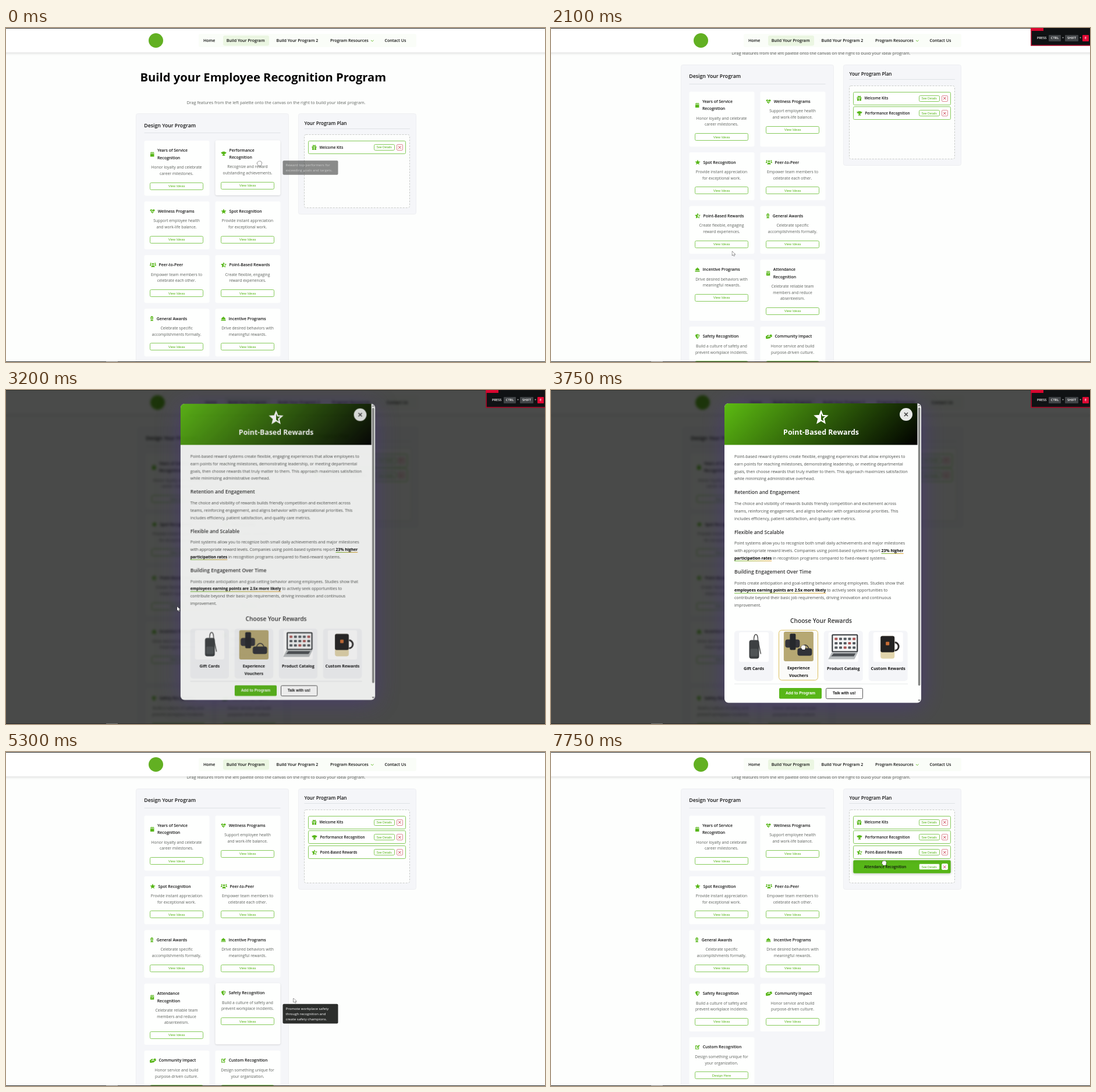
An HTML page with a canvas for the animation above (7.8 s loop, 926 px wide and 575 px high).

```html
<!DOCTYPE html>
<html lang="en">
<head>
<meta charset="utf-8">
<title>Recognition program builder</title>
<style>
html, body { margin: 0; width: 100%; height: 100%; overflow: hidden; background: #fdfefd; }
canvas { display: block; }
</style>
</head>
<body>
<canvas id="stage" width="926" height="575"></canvas>
<script>
const W = 926, H = 575, LOOP = 7800;
const GREEN = '#57b618', EDGE = '#78c448';
const SANS = '"Open Sans", "Noto Sans", sans-serif', ARIAL = '"Liberation Sans", Arial, sans-serif';
const view = document.getElementById('stage').getContext('2d');
const layer = () => Object.assign(document.createElement('canvas'), { width: W, height: H }).getContext('2d');
const page = layer(), ghost = layer();
let g = view;

// Times (ms) of the main events
const DROP1 = 1050, OPEN = 3000, CLOSE = 4600, DRAG2 = 6250, DROP2 = 7400;

const clamp = v => Math.max(0, Math.min(1, v));
const ramp = (t, a, b) => clamp((t - a) / (b - a));
const ease = k => k * k * (3 - 2 * k);

function starPath(cx, cy, r) {
  let d = '';
  for (let i = 0; i < 10; i++) {
    const a = i * Math.PI / 5 - Math.PI / 2, q = i % 2 ? r * 0.45 : r;
    d += (i ? 'L' : 'M') + (cx + q * Math.cos(a)) + ' ' + (cy + q * Math.sin(a));
  }
  return d + 'z';
}
const disc = (x, y, r) => `M${x - r} ${y}a${r} ${r} 0 1 0 ${2 * r} 0a${r} ${r} 0 1 0 ${-2 * r} 0z`;
const CAL = 'M1 3h14v13h-14zM4 0h2v4h-2zM10 0h2v4h-2z';

// Icons in a 16 unit box: [filled shape, light line on top]
const ICONS = {
  cal: [CAL, 'M1 6h14'],
  check: [CAL, 'M1 6h14M5 10l2 2l4-4'],
  trophy: ['M4 1h8v2h4c0 4-2 5-5 6c-1 2-2 2-2 3h3v3h-8v-3h3c0-1-1-1-2-3c-3-1-5-2-5-6h4z'],
  heart: ['M8 15L1 8C-2 4 3-1 8 4C13-1 18 4 15 8z', 'M0 8h4l2-3l3 6l2-3h5'],
  star: [starPath(8, 8.5, 8.8)],
  people: [disc(8, 5, 2.7) + disc(2, 3, 2) + disc(14, 3, 2) + 'M3 15c0-8 10-8 10 0zM-1 10c0-5 5-5 5-2l-2 2zM17 10c0-5-5-5-5-2l2 2z'],
  award: [disc(8, 6, 6) + 'M4 10h8l2 6l-4-1l-2 1l-2-1l-4 1z', disc(8, 6, 2)],
  bell: ['M1 11a7 7 0 0 1 14 0zM0 12.5h16v2.5h-16zM6.5 2h3v3h-3z'],
  shield: ['M8 0l7 3c0 6-3 10-7 13c-4-3-7-7-7-13z', 'M9 3l3 1.5c0 4-1 5-3 7z'],
  hands: ['M-1 8l6-5l4 1l5-3l3 6l-7 7l-10 2z', 'M4 10l4-4l4 3'],
  pen: ['M1 3h7v2h-5v8h8v-5h2v7h-12zM6 8l7-7l3 2l-8 8h-2z'],
  gift: ['M0 5h16v4h-16zM1 10h14v6h-14zM3 4c-2-5 4-5 5-1c1-4 7-4 5 1z', 'M8 5v11']
};

const card = (icon, dx, title, desc, tip = '') =>
  ({ icon, dx, title: title.split('|'), desc: desc.split('|'), tip: tip.split('|') });
const CARDS = {
  years: card('cal', 12.4, 'Years of Service|Recognition', 'Honor loyalty and celebrate|career milestones.'),
  perf: card('trophy', 14, 'Performance|Recognition', 'Recognize and reward|outstanding achievements.', 'Reward top performers for|exceeding goals and targets.'),
  well: card('heart', 13.2, 'Wellness Programs', 'Support employee health|and work-life balance.'),
  spot: card('star', 14, 'Spot Recognition', 'Provide instant appreciation|for exceptional work.'),
  peer: card('people', 15, 'Peer-to-Peer', 'Empower team members to|celebrate each other.'),
  point: card('half', 14, 'Point-Based Rewards', 'Create flexible, engaging|reward experiences.', 'Build a flexible program|where points are earned|and redeemed easily.'),
  general: card('award', 11.2, 'General Awards', 'Celebrate specific|accomplishments formally.'),
  incent: card('bell', 13, 'Incentive Programs', 'Drive desired behaviors with|meaningful rewards.'),
  attend: card('check', 12.2, 'Attendance|Recognition', 'Celebrate reliable team|members and reduce|absenteeism.', 'Recognize perfect|attendance and improvement|to build reliability culture.'),
  safety: card('shield', 13.2, 'Safety Recognition', 'Build a culture of safety and|prevent workplace incidents.', 'Promote workplace safety|through recognition and|create safety champions.'),
  community: card('hands', 15, 'Community Impact', 'Honor service and build|purpose-driven culture.'),
  custom: card('pen', 13.2, 'Custom Recognition', 'Design something unique for|your organization.')
};
const KITS = card('gift', 13, 'Welcome Kits', '');

// Outlined boxes snap to the pixel grid so their lines stay thin
function box(x, y, w, h, r, fill, stroke) {
  if (stroke) [x, y, w, h] = [Math.floor(x) + 0.5, Math.floor(y) + 0.5, Math.floor(w), Math.floor(h)];
  g.beginPath();
  g.roundRect(x, y, w, h, r);
  if (fill) { g.fillStyle = fill; g.fill(); }
  if (stroke) { g.strokeStyle = stroke; g.lineWidth = 0.9; g.stroke(); }
}
function text(s, x, y, size, color = '#111', weight = 400, align = 'left', family = SANS) {
  g.font = `${weight} ${size}px ${family}`;
  g.textAlign = align;
  g.fillStyle = color;
  g.fillText(s, x, y + size * 0.35);
}
function shape(d, fill) { g.fillStyle = fill; g.fill(new Path2D(d)); }
function rule(x, y, w, color) { g.fillStyle = color; g.fillRect(x, y, w, 1); }
function shadow(color, blur, dy = 0) { g.shadowColor = color; g.shadowBlur = blur; g.shadowOffsetY = dy; }
function noShadow() { shadow('transparent', 0); }

function icon(name, x, cy, w, h, color = GREEN, light = '#fff') {
  g.save();
  g.translate(x, cy - h / 2);
  g.scale(w / 16, h / 16);
  g.lineWidth = 1.7;
  if (name === 'half') {
    const star = new Path2D(starPath(8, 8.5, 8));
    g.strokeStyle = color;
    g.stroke(star);
    g.beginPath();
    g.rect(-2, -2, 10, 20);
    g.clip();
    g.fillStyle = color;
    g.fill(star);
  } else {
    shape(ICONS[name][0], color);
    g.strokeStyle = light;
    if (ICONS[name][1]) g.stroke(new Path2D(ICONS[name][1]));
  }
  g.restore();
}

function layout(placed, scroll) {
  const names = Object.keys(CARDS).filter(n => !placed.includes(n)), spots = {};
  const height = n => 61 + 12.3 * (CARDS[n].title.length - 1) + 10.7 * CARDS[n].desc.length;
  for (let i = 0, y = 194 - scroll; i < names.length; i += 2) {
    const row = names.slice(i, i + 2), h = Math.max(...row.map(height));
    row.forEach((n, col) => spots[n] = { x: col ? 359.5 : 237.5, y, w: 112, h });
    y += h + 9.9;
  }
  return spots;
}

function drawCard(name, s, lifted, pressed) {
  const c = CARDS[name], mid = s.x + 55.5, lines = c.title.length;
  let y = s.y - (lifted ? 0.8 : 0);
  if (lifted) shadow('rgba(0,0,0,.14)', 3, 1);
  box(s.x, y, s.w, s.h, 3, '#fefffe');
  noShadow();
  y += 17;
  icon(c.icon, s.x + 10, y + (lines - 1) * 6.2, c.dx - 5, 8.5);
  c.title.forEach((l, i) => text(l, s.x + 10 + c.dx, y + i * 12.4, 6.9, '#111', 600));
  y += (lines - 1) * 12.4 + 16.5;
  c.desc.forEach((l, i) => text(l, mid, y + i * 10.7, 6.75, '#5c605c', 400, 'center'));
  y += (c.desc.length - 1) * 10.7 + 21.4;
  box(s.x + 10, y - 6, 91, 12, 2, pressed ? GREEN : '#fff', EDGE);
  text(name === 'custom' ? 'Design Here' : 'View Ideas', mid, y, 5.9, pressed ? '#fff' : GREEN, 400, 'center', ARIAL);
}

function drawTip(name, s, alpha) {
  const tip = CARDS[name].tip, h = tip.length * 9.3 + 6;
  const x = s.x + 116, y = s.y + s.h / 2 - h / 2 - 0.8;
  g.save();
  g.globalAlpha *= alpha;
  box(x, y, 95, h, 2, '#2c2e2c');
  tip.forEach((l, i) => text(l, x + 5, y + 7.8 + i * 9.3, 6.1, '#fff'));
  g.restore();
}

function drawItem(c, y, hot) {
  if (hot) { y -= 0.8; shadow('rgba(0,0,0,.2)', 4, 1); }
  box(519.5, y - 11, 167, 22, 2, hot ? GREEN : '#fff', EDGE);
  noShadow();
  icon(c.icon, 525.5, y, c.dx - 5, 8.5, GREEN, hot ? GREEN : '#fff');
  text(c.title.join(' '), 525.5 + c.dx, y, 6.3, '#111', 600);
  box(632, y - 5, 35, 10, 2, '#fff', EDGE);
  text('See Details', 649.7, y, 5.2, GREEN, 400, 'center', ARIAL);
  box(671, y - 5, 10, 10, 1.5, '#fff', hot ? '#fff' : '#d8808a');
  g.strokeStyle = '#c52b3d';
  g.beginPath();
  for (const d of [-1, 1]) { g.moveTo(674, y - 2.3 * d); g.lineTo(678.6, y + 2.3 * d); }
  g.stroke();
}

function drawPlan(items, scroll, over, hotIndex) {
  const y = 147.5 - scroll;
  box(502.5, y, 202, 173, 3, '#f5f6f9', '#eceef1');
  text('Your Program Plan', 512.5, y + 16.5, 8.15, '#111', 600);
  rule(512.5, Math.round(y + 25), 181.5, '#dfe2e6');
  g.setLineDash([3, 2]);
  box(512.5, y + 36, 181, 126, 3, '#fdfefd', over ? '#74c63e' : '#c4c8c4');
  g.setLineDash([]);
  items.forEach((c, i) => drawItem(c, y + 58 + i * 25.9, i === hotIndex));
  if (over) {
    const tint = g.createLinearGradient(513, y + 36, 693, y + 162);
    tint.addColorStop(0, 'rgba(70,145,225,.13)');
    tint.addColorStop(1, 'rgba(110,180,190,.07)');
    box(513, y + 36, 180.5, 126, 3, tint);
  }
}

function drawHeader() {
  shadow('rgba(0,0,0,.16)', 5, 1);
  box(-10, 0, W + 20, 42, 0, '#fff');
  noShadow();
  g.fillStyle = '#62b022';
  g.beginPath();
  g.arc(257.5, 21.5, 12.5, 0, 7);
  g.fill();
  box(331, 10, 374, 23, 3, '#fafdf8');
  box(373, 13, 79, 17.5, 3, '#ebf6e2');
  const menu = [['Home', 339], ['Build Your Program', 378.7], ['Build Your Program 2', 464.5], ['Program Resources', 557], ['Contact Us', 650.5]];
  menu.forEach(([s, x]) => text(s, x, 21.7, 7.05, '#111', 600));
  g.strokeStyle = GREEN;
  g.lineWidth = 0.9;
  g.stroke(new Path2D('M627 21l2.3 2l2.3-2'));
}

function drawPage(t, placed, spots, scroll) {
  g.fillStyle = '#fdfefd';
  g.fillRect(0, 0, W, H);
  g.save();
  if (t >= OPEN && t < CLOSE + 150) g.translate(3, 0);
  text('Build your Employee Recognition Program', 230.5, 84.5 - scroll, 20.2, '#050505', 700);
  text('Drag features from the left palette onto the canvas on the right to build your ideal program.', 464, 128 - scroll, 7.22, '#606460', 400, 'center');
  box(223.5, 147.5 - scroll, 262, 600, 3, '#f5f6f9', '#eceef1');
  text('Design Your Program', 237.3, 167.7 - scroll, 8.75, '#111', 600);
  rule(237.5, Math.round(180 - scroll), 234, '#dfe2e6');

  const hover = hovered(t);
  for (const n in spots) drawCard(n, spots[n], n === hover.name, n === 'point' && t > 2450 && t < 3200);
  const over = (t > 650 && t < DROP1) || (t > DRAG2 + 200 && t < DROP2);
  const hot = t >= DROP2 ? 3 : t >= DROP1 && t < 1250 ? 1 : -1;
  drawPlan([KITS, ...placed.map(n => CARDS[n])], scroll, over, hot);
  if (hover.name && spots[hover.name]) drawTip(hover.name, spots[hover.name], hover.alpha);
  drawHeader();
  g.restore();
}

function hovered(t) {
  if (t < DROP1) return { name: 'perf', alpha: 0.55 + 0.45 * ramp(t, 50, 200) };
  const spans = [['point', 2200, 3200], ['safety', 4950, 5500], ['attend', 5650, DROP2]];
  const s = spans.find(([, a, b]) => t >= a && t < b);
  return s ? { name: s[0], alpha: ramp(t, s[1], s[1] + 150) } : {};
}

// Dragged copy of a card, fading out with distance from the pointer
function drawGhost(name, spot, from, to) {
  g = ghost;
  g.clearRect(0, 0, W, H);
  g.save();
  g.translate(Math.round(to[0] - from[0]), Math.round(to[1] - from[1]));
  drawCard(name, spot, false);
  drawTip(name, spot, 1);
  g.restore();
  g.save();
  g.globalCompositeOperation = 'destination-in';
  g.translate(...to);
  g.scale(2.1, 1);
  const fade = g.createRadialGradient(0, 0, 0, 0, 0, 76);
  fade.addColorStop(0, 'rgba(0,0,0,.78)');
  fade.addColorStop(1, 'rgba(0,0,0,0)');
  g.fillStyle = fade;
  g.fillRect(-W, -H, 2 * W, 2 * H);
  g.restore();
  g = view;
  g.drawImage(ghost.canvas, 0, 0);
}

const COPY = [
  [115, 'Point-based reward systems create flexible, engaging experiences that allow employees to', 'earn points for reaching milestones, demonstrating leadership, or meeting departmental', 'goals, then choose rewards that truly matter to them. This approach maximizes satisfaction', 'while minimizing administrative overhead.'],
  [196, 'The choice and visibility of rewards builds friendly competition and excitement across', 'teams, reinforcing engagement, and aligns behavior with organizational priorities. This', 'includes efficiency, patient satisfaction, and quality care metrics.'],
  [264, 'Point systems allow you to recognize both small daily achievements and major milestones', 'with appropriate reward levels. Companies using point-based systems report *23% higher', '*participation rates* in recognition programs compared to fixed-reward systems.'],
  [332.3, 'Points create anticipation and goal-setting behavior among employees. Studies show that', '*employees earning points are 2.5x more likely* to actively seek opportunities to', 'contribute beyond their basic job requirements, driving innovation and continuous', 'improvement.']
];

// Asterisks switch the underlined bold style on and off
function richLine(line, x, y) {
  line.split('*').forEach((part, i) => {
    const bold = i % 2;
    text(part, x, y, bold ? 6.9 : 7.03, bold ? '#000' : '#4a4d4a', bold ? 700 : 400);
    const w = g.measureText(part).width;
    if (bold) {
      const underline = g.createLinearGradient(x, 0, x + w, 0);
      underline.addColorStop(0, '#68b52c');
      underline.addColorStop(1, '#e0a030');
      rule(x, y + 4.4, w, underline);
    }
    x += w;
  });
}

function sling(x, y) {
  g.strokeStyle = '#555';
  g.lineWidth = 1.5;
  g.stroke(new Path2D(`M${x} ${y - 12}c0-13 7-13 7 0l5 24`));
  box(x - 8, y - 12, 17, 32, 4, '#3d4042');
  box(x - 6, y + 3, 13, 13, 2, '#505456');
}
function luggage(x, y) {
  box(x - 25.5, y - 25.5, 51, 51, 3, '#b6a873');
  box(x - 23, y - 12, 25, 14, 4, '#34343a');
  box(x - 15, y - 22, 10, 28, 2, '#26282c');
  g.strokeStyle = '#34343a';
  g.lineWidth = 1.3;
  g.stroke(new Path2D(`M${x + 4} ${y + 5}c3-10 11-10 14 0`));
  box(x - 2, y + 3, 25, 13, 4, '#303238');
}
function laptop(x, y) {
  box(x - 20, y - 22, 45, 31, 2, '#33373a');
  box(x - 18, y - 20, 41, 27, 0, '#f4f5f5');
  for (let i = 0; i < 15; i++) box(x - 15 + i % 5 * 7.7, y - 16 + Math.floor(i / 5) * 7.5, 5, 4, 1, i % 4 ? '#555b60' : '#a55');
  shape(`M${x - 20} ${y + 9}h45l-6 12h-45z`, '#b8bcbe');
  shape(`M${x - 17} ${y + 11}h38l-3 5h-39z`, '#4c5054');
}
function mug(x, y) {
  g.strokeStyle = '#2d2b2b';
  g.lineWidth = 3;
  g.beginPath();
  g.arc(x + 11, y - 1, 7, -1.5, 1.5);
  g.stroke();
  box(x - 13, y - 19, 24, 39, 4, '#e2d5ac');
  box(x - 13, y - 19, 24, 28, 3, '#242323');
  box(x - 4, y - 9, 6, 6, 1, '#c96d35');
}

function drawModal(t) {
  shadow('rgba(75,50,150,.55)', 42, 4);
  box(298, 23, 338, 515.5, 7, '#fefffe');
  noShadow();
  const sweep = g.createLinearGradient(363, -42, 565, 160);
  sweep.addColorStop(0, '#5cbb12');
  sweep.addColorStop(1, '#000');
  box(298, 23, 331.5, 71.5, [7, 0, 0, 0], sweep);
  icon('half', 453.5, 47, 21, 21, '#fff');
  text('Point-Based Rewards', 464, 73, 12.4, '#fff', 700, 'center');
  g.fillStyle = '#e7e9e7';
  g.beginPath();
  g.arc(610, 42, 11, 0, 7);
  g.fill();
  g.strokeStyle = '#444';
  g.lineWidth = 1.7;
  g.stroke(new Path2D('M607 39l6 6M613 39l-6 6'));
  box(630.8, 30, 3.6, 479, 2, '#858785');
  shape('M630.5 28l2-3l2 3zM630.5 533l2 3l2-3z', '#777');

  COPY.forEach(([y, ...lines]) => lines.forEach((l, i) => richLine(l, 315, y + i * 12.65)));
  [['Retention and Engagement', 176.3], ['Flexible and Scalable', 244.7], ['Building Engagement Over Time', 313]]
    .forEach(([s, y]) => text(s, 315, y, 8.55, '#333', 600));
  text('Choose Your Rewards', 464, 397.5, 10.2, '#333', 600, 'center');

  const rewards = [['Gift Cards', sling], ['Experience|Vouchers', luggage], ['Product Catalog', laptop], ['Custom Rewards', mug]];
  rewards.forEach(([label, photo], i) => {
    const x = 315 + i * 76.9, hot = i === 1 && t > 3600 && t < 4150, y = hot ? 413.5 : 414.5;
    box(x, y, 67, 86.5, 5, hot ? '#fbfbf9' : '#f4f5f8', hot ? '#d9b84e' : null);
    box(x + 8, y + 2.5, 51, 51, 3, '#fff');
    photo(x + 33.5, y + 28);
    label.split('|').forEach((l, k) => text(l, x + 33.5, y + 65.5 + k * 12.7, 7.1, '#111', 700, 'center'));
  });
  rule(315, 505.5, 298, '#e7e9eb');
  box(392, 513, 73, 18.5, 2, GREEN);
  text('Add to Program', 428.5, 522, 6.75, '#fff', 700, 'center', ARIAL);
  box(472, 513, 63, 18, 2, '#fff', '#444');
  text('Talk with us!', 503.8, 522, 6.6, '#111', 700, 'center', ARIAL);
}

function drawPopup(k) {
  if (!k) return;
  g.save();
  g.translate(102 * (1 - k), 0);
  box(824.5, 0, 102, 30.5, 0, '#101214');
  g.fillStyle = '#d9062f';
  g.fillRect(824.5, 0, 21.5, 5);
  g.fillRect(824.5, 0, 1.2, 30.5);
  g.fillRect(824.5, 29.3, 102, 1.2);
  text('PRESS', 835, 17.5, 5.6, '#fff', 600);
  [['CTRL', 855, 21, '#404346'], ['SHIFT', 883, 23, '#404346'], ['E', 913, 11, '#e00a34']].forEach(([s, x, w, c]) => {
    box(x, 12, w, 11, 1, c);
    text(s, x + w / 2, 17.5, 5.6, '#fff', 600, 'center');
  });
  for (const x of [879.5, 909.5]) text('+', x, 17.5, 5.6, '#ddd', 600, 'center');
  g.restore();
}

// Pointer stops: time, x, y
const PATH = [
  [500, 435, 233], [900, 560, 248], [1100, 562, 250], [1400, 475, 261], [2050, 312, 385], [2500, 294, 373],
  [3250, 294, 373], [3650, 433, 443], [4000, 433, 443], [4350, 430, 521], [4700, 430, 521], [5200, 494, 424],
  [5400, 494, 424], [5950, 288, 422], [DRAG2, 288, 422], [6600, 570, 192], [6900, 572, 191]
];
function pointer(t) {
  const i = PATH.findIndex(p => p[0] > t);
  if (i === 0) return PATH[0].slice(1);
  if (i < 0) return PATH[PATH.length - 1].slice(1);
  const [a, b] = [PATH[i - 1], PATH[i]], k = ease(ramp(t, a[0], b[0]));
  return [a[1] + (b[1] - a[1]) * k, a[2] + (b[2] - a[2]) * k];
}
function drawPointer(t, [x, y]) {
  const hand = t < 500 || (t > 3500 && t < 4650) || t >= DROP2;
  const d = hand ? 'M-3 0c0-4 2-4 2-1c0-4 2-4 2-1c1-3 2-2 2 0c2-1 1 3 0 6h-4l-3-4z' : 'M0 0v7l1.7-1.5l1.2 2.6l1.2-.6l-1.2-2.5h2.3z';
  g.save();
  g.translate(x, y);
  g.lineWidth = 0.9;
  g.strokeStyle = '#222';
  g.stroke(new Path2D(d));
  shape(d, '#fff');
  g.restore();
}

function draw(t) {
  const placed = [];
  if (t >= DROP1) placed.push('perf');
  if (t >= CLOSE) placed.push('point');
  if (t >= DROP2) placed.push('attend');
  const scroll = 84.5 * ease(ramp(t, 1550, 2000));
  const spots = layout(placed, scroll), at = pointer(t);

  g = page;
  drawPage(t, placed, spots, scroll);
  g = view;
  g.drawImage(page.canvas, 0, 0);

  const closing = ramp(t, CLOSE, CLOSE + 150);
  if (t >= OPEN && closing < 1) {
    g.save();
    g.globalAlpha = 1 - closing;
    g.filter = 'blur(2.3px)';
    g.drawImage(page.canvas, 0, 0);
    g.filter = 'none';
    g.fillStyle = 'rgba(0,2,0,.71)';
    g.fillRect(0, 0, W, H);
    g.restore();

    const k = 1 - (1 - ramp(t, OPEN, OPEN + 300)) ** 2, size = 0.9 + 0.1 * k;
    g = ghost;
    g.clearRect(0, 0, W, H);
    drawModal(t);
    g = view;
    g.save();
    g.globalAlpha = (0.05 + 0.95 * k) * (1 - closing);
    g.translate(467, 280.5 - 19 * (1 - k));
    g.scale(size, size);
    g.drawImage(ghost.canvas, -467, -280.5);
    g.restore();
  }

  if (t >= 500 && t < DROP1) drawGhost('perf', spots.perf, [435, 233], at);
  if (t >= DRAG2 && t < DROP2) drawGhost('attend', spots.attend, [288, 422], at);

  rule(0, 0, W, '#2a2c2a');
  rule(0, 574, W, '#2a2c2a');
  rule(172, 574, 20, '#747674');
  drawPopup(ease(ramp(t, 100, 250)) * (1 - ease(ramp(t, 4950, 5150))));
  drawPointer(t, at);
}

function tick() {
  draw(performance.now() % LOOP);
  requestAnimationFrame(tick);
}
tick();
</script>
</body>
</html>
```
